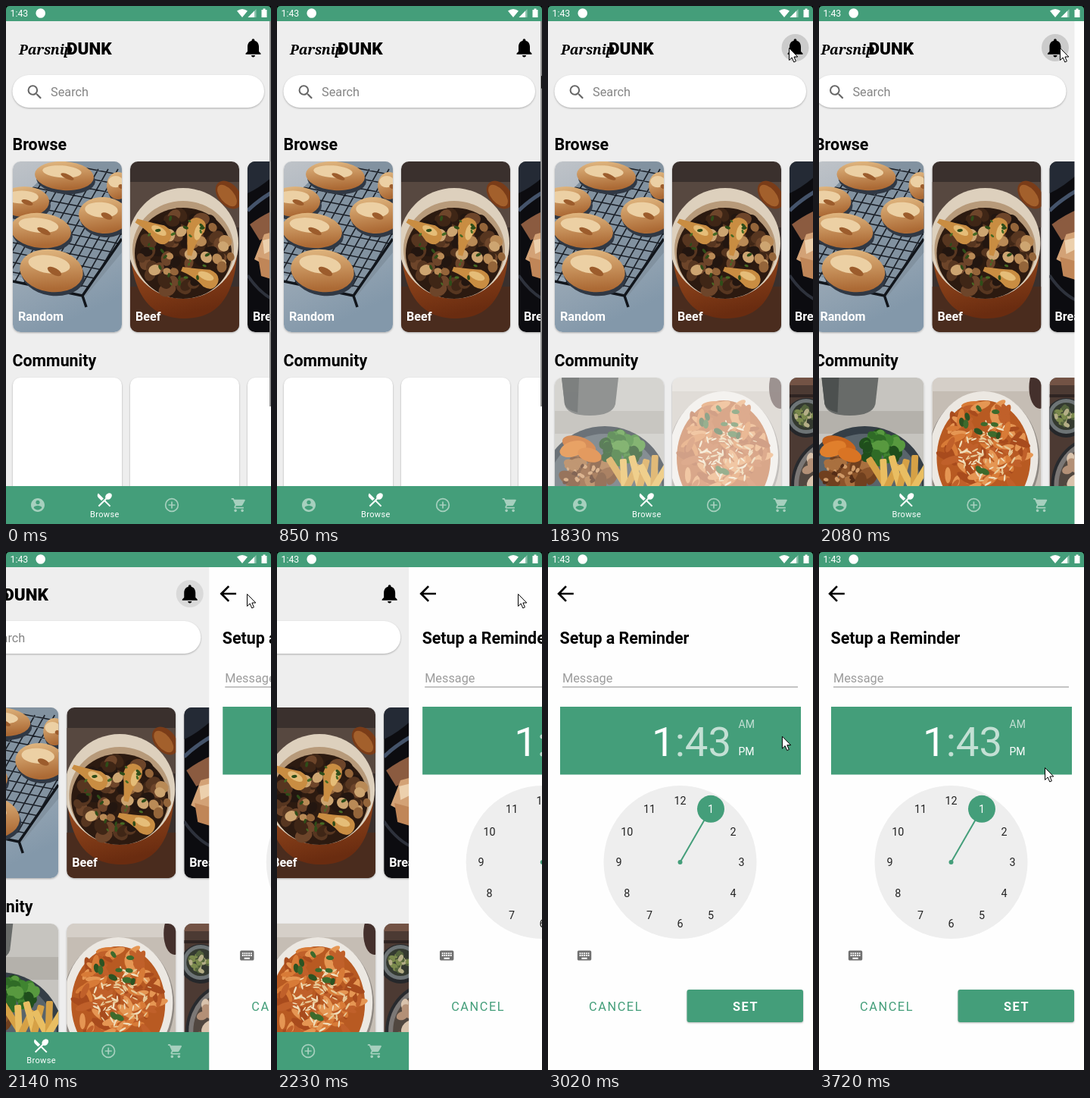
An HTML page that plays this animation: 350 by 683 pixels, repeating every 4.41 s.

```html
<!DOCTYPE html>
<html lang="en">
<head>
<meta charset="utf-8">
<title>Recipe app reminder</title>
<style>
  html, body { margin: 0; width: 100%; height: 100%; overflow: hidden; background: #fff; }
  svg { display: block; width: 350px; height: 683px; font-family: Roboto, sans-serif; }
  .bold { font-weight: 700; }
  .head { font-weight: 700; font-size: 21.4px; }
  .label { font-weight: 700; font-size: 16.1px; fill: #fff; }
  .lift { filter: drop-shadow(0 1px 1px rgba(0,0,0,.28)); }
  .mid { text-anchor: middle; }
</style>
</head>
<body>
<svg id="stage" viewBox="0 0 350 683"></svg>
<script>
const GREEN = '#449e7a', LOOP = 4410;

let seed = 7;
const rnd = () => (seed = (seed * 16807) % 2147483647) / 2147483647;
const pick = list => list[Math.floor(rnd() * list.length)];

const rect = (x, y, w, h, fill, more = '') =>
  `<rect x="${x}" y="${y}" width="${w}" height="${h}" fill="${fill}" ${more}/>`;
const oval = (x, y, rx, ry, fill, turn = 0) =>
  `<ellipse rx="${rx}" ry="${ry}" fill="${fill}" transform="translate(${x} ${y}) rotate(${turn})"/>`;
const path = (d, fill, more = '') => `<path d="${d}" fill="${fill}" ${more}/>`;
const text = (x, y, s, more = '') => `<text x="${x}" y="${y}" ${more}>${s}</text>`;
const group = (x, y, body, more = '') => `<g transform="translate(${x} ${y})" ${more}>${body}</g>`;
const icon = (x, y, k, d, fill) => path(d, fill, `transform="translate(${x} ${y}) scale(${k})"`);

// Random bits strewn inside an ellipse
function scatter(n, cx, cy, rx, ry, colors, w, h) {
  let out = '';
  for (let i = 0; i < n; i++) {
    const a = rnd() * 2 * Math.PI, r = Math.sqrt(rnd()), k = .7 + rnd() * .6;
    out += oval((cx + Math.cos(a) * r * rx).toFixed(1), (cy + Math.sin(a) * r * ry).toFixed(1),
      (w * k).toFixed(1), (h * k).toFixed(1), pick(colors), Math.floor(rnd() * 180));
  }
  return out;
}

const ICON = {
  bell: 'M12 22c1.1 0 2-.9 2-2h-4c0 1.1.89 2 2 2zm6-6v-5c0-3.07-1.64-5.64-4.5-6.32V4c0-.83-.67-1.5-1.5-1.5s-1.5.67-1.5 1.5v.68C7.63 5.36 6 7.92 6 11v5l-2 2v1h16v-1l-2-2z',
  search: 'M15.5 14h-.79l-.28-.27A6.47 6.47 0 0 0 16 9.5 6.5 6.5 0 1 0 9.5 16c1.61 0 3.09-.59 4.23-1.57l.27.28v.79l5 4.99L20.49 19l-4.99-5zm-6 0C7.01 14 5 11.99 5 9.5S7.01 5 9.5 5 14 7.01 14 9.5 11.99 14 9.5 14z',
  user: 'M12 2C6.48 2 2 6.48 2 12s4.48 10 10 10 10-4.48 10-10S17.52 2 12 2zm0 3c1.66 0 3 1.34 3 3s-1.34 3-3 3-3-1.34-3-3 1.34-3 3-3zm0 14.2c-2.5 0-4.71-1.28-6-3.22.03-1.99 4-3.08 6-3.08 1.99 0 5.97 1.09 6 3.08-1.29 1.94-3.5 3.22-6 3.22z',
  menu: 'M8.1 13.34l2.83-2.83L3.91 3.5c-1.56 1.56-1.56 4.09 0 5.66l4.19 4.18zm6.78-1.81c1.53.71 3.68.21 5.27-1.38 1.91-1.91 2.28-4.65.81-6.12-1.46-1.46-4.2-1.1-6.12.81-1.59 1.59-2.09 3.74-1.38 5.27L3.7 19.87l1.41 1.41L12 14.41l6.88 6.88 1.41-1.41L13.41 13l1.47-1.47z',
  cart: 'M7 18c-1.1 0-1.99.9-1.99 2S5.9 22 7 22s2-.9 2-2-.9-2-2-2zM1 2v2h2l3.6 7.59-1.35 2.45c-.16.28-.25.61-.25.96 0 1.1.9 2 2 2h12v-2H7.42c-.14 0-.25-.11-.25-.25l.03-.12.9-1.63h7.45c.75 0 1.41-.41 1.75-1.03l3.58-6.49A1 1 0 0 0 20 4H5.21l-.94-2H1zm16 16c-1.1 0-1.99.9-1.99 2s.89 2 1.99 2 2-.9 2-2-.9-2-2-2z',
  back: 'M20 11H7.83l5.59-5.59L12 4l-8 8 8 8 1.41-1.41L7.83 13H20v-2z',
  keys: 'M20 5H4c-1.1 0-1.99.9-1.99 2L2 17c0 1.1.9 2 2 2h16c1.1 0 2-.9 2-2V7c0-1.1-.9-2-2-2zm-9 3h2v2h-2V8zm0 3h2v2h-2v-2zM8 8h2v2H8V8zm0 3h2v2H8v-2zm-1 2H5v-2h2v2zm0-3H5V8h2v2zm9 7H8v-2h8v2zm0-4h-2v-2h2v2zm0-3h-2V8h2v2zm3 3h-2v-2h2v2zm0-3h-2V8h2v2z',
  pointer: 'M.5 .5V16.5L4.2 13 6.8 19 9.4 17.8 6.9 12H11.8Z'
};

function pastries() {
  let s = rect(0, 0, 144, 225, 'url(#slate)') + path('M0 60L60 0H144V120L96 178 0 150Z', '#8292a0');
  let wires = '';
  for (let i = 0; i < 13; i++) {
    wires += `M${i * 13 - 40} 165L${i * 13 + 48} 10`;
    wires += `M0 ${i * 13 - 10}L144 ${i * 13 + 18}`;
  }
  s += path(wires, 'none', 'stroke="#1b2028" stroke-width="1.6" clip-path="url(#rack)"');
  s += path('M0 158L92 177 144 102M92 177L97 192', 'none', 'stroke="#12161c" stroke-width="3.5"');
  for (const [x, y, rx, ry, a] of [[68, 19, 39, 19, 4], [15, 53, 33, 20, 0], [139, 32, 15, 18, 0],
    [120, 71, 33, 24, 4], [37, 91, 40, 23, 6], [51, 144, 42, 28, 8]])
    s += oval(x + 2, y + 5, rx, ry, '#303844', a) + oval(x, y, rx, ry, 'url(#crust)', a)
      + oval(x - 3, y - ry * .3, rx * .66, ry * .42, '#ecd0a4', a)
      + oval(x + 4, y + 1, rx * .24, ry * .16, '#9c5c2c', a + 20);
  return s;
}

function stew() {
  return rect(0, 0, 144, 225, '#3a302d') + rect(0, 27, 144, 60, '#574840')
    + rect(0, 165, 144, 60, '#4a2c1e')
    + oval(130, 44, 21, 14, '#7a3c18', 50) + oval(128, 45, 17, 9, '#a3602c', 50)
    + path('M0 110C2 180 30 207 72 207S140 180 142 110Z', 'url(#clay)')
    + oval(70, 108, 73, 73, '#ddd0bd') + oval(70, 116, 67, 64, '#b79a7a') + oval(70, 121, 64, 60, '#2c1a10')
    + scatter(70, 70, 121, 56, 52, ['#3f2616', '#573620', '#6d452a', '#231610'], 9, 7)
    + scatter(20, 78, 122, 55, 50, ['#b98a56', '#94653a', '#cda571'], 7, 6)
    + [[34, 93, 30], [86, 95, -75], [96, 153, 22]].map(([x, y, a]) => group(x, y,
      path('M-30 -3Q-10 -8 5 -13 21 -13 21 0 20 13 5 11 -10 3 -30 3Z', '#c98d42', `transform="rotate(${a})"`)
      + oval(4, -2, 11, 5, '#e5bd78', a))).join('')
    + scatter(26, 66, 118, 48, 45, ['#466a24', '#2f4d19'], 3, 1.6);
}

function skillet() {
  return rect(0, 0, 144, 225, '#0c0c10') + path('M0 42Q18 34 40 14V0H0Z', '#242a35')
    + path('M0 65Q15 50 40 36', 'none', 'stroke="#44536a" stroke-width="5"')
    + path('M3 83Q20 70 40 62V92L16 104Z', '#8b5b40')
    + path('M22 96L44 90V128L26 138 9 129Z', '#d3a276')
    + path('M14 126L44 134V159L18 151Z', '#c08658') + path('M20 104L40 99V113L22 122Z', '#ecd0ad')
    + path('M0 150Q18 177 42 186', 'none', 'stroke="#2e323c" stroke-width="4"');
}

function dinner() {
  return rect(0, 0, 144, 225, '#c6c4bf') + rect(0, 44, 144, 30, '#b4b1ab')
    + path('M9 0H84L80 35Q76 50 46 50T13 35Z', '#686b69') + path('M9 0H32L30 46Q16 43 13 35Z', '#4c504f')
    + oval(66, 146, 84, 82, '#343e46') + oval(66, 150, 76, 76, '#59646b')
    + scatter(22, 44, 128, 35, 22, ['#70401f', '#8c542b', '#a9703f'], 14, 8)
    + oval(32, 89, 23, 11, '#c9651d', 18) + oval(24, 94, 18, 10, '#e07f2c', -18) + oval(46, 102, 16, 9, '#d97424', 16)
    + scatter(48, 88, 94, 26, 21, ['#2f6b26', '#3f8430', '#1f4e1c', '#58993f'], 7, 6)
    + [0, 1, 2, 3, 4, 5, 6, 7].map(i => rect(-5, -24, 9, 48, i % 2 ? '#e9be62' : '#d6a146',
      `rx="2" transform="translate(${84 + i * 8} ${126 + i % 3 * 5}) rotate(${i * 29 % 70 - 32})"`)).join('')
    + scatter(20, 36, 130, 26, 16, ['#d09a68', '#542c16'], 3, 2);
}

function pasta() {
  return rect(0, 0, 144, 225, '#c5bdb4') + rect(0, 0, 144, 18, '#d5cfc8')
    + oval(142, 13, 14, 28, '#44302c') + oval(68, 107, 74, 88, '#8f8983') + oval(68, 104, 72, 86, '#ece8e2')
    + oval(68, 106, 62, 76, '#b85a22')
    + scatter(130, 68, 102, 54, 70, ['#d87b37', '#c0602a', '#e59653', '#a84b1d'], 11, 4)
    + scatter(90, 74, 98, 38, 42, ['#f0dfbd', '#e8c996'], 4, 1)
    + scatter(12, 68, 88, 48, 48, ['#3d6a2c', '#2c5322'], 6, 3.5);
}

function plank() {
  return rect(0, 0, 144, 225, '#4c3a33') + rect(0, 22, 144, 4, '#2e2422') + rect(0, 0, 144, 10, '#735345')
    + oval(22, 53, 27, 26, '#25272a') + oval(22, 51, 24, 23, '#6d7476') + oval(22, 51, 19, 18, '#343a30')
    + scatter(26, 20, 51, 15, 13, ['#7b8a4d', '#b4ae86', '#53633c'], 4, 2.5)
    + oval(66, 142, 64, 66, '#282a2e') + oval(66, 142, 60, 62, '#7b7775') + oval(66, 142, 54, 56, '#514740')
    + scatter(40, 55, 140, 44, 46, ['#d9c3ad', '#b39077', '#8a6248'], 10, 7);
}

function card(x, y, photo, label, id) {
  const body = id ? `<g id="${id}" clip-path="url(#card)">${photo}</g>` : `<g clip-path="url(#card)">${photo}</g>`;
  return group(x, y, rect(0, 0, 144, 225, '#fff', 'rx="10" class="lift"') + body
    + (label ? text(7, 210, label, 'class="label"') : ''));
}

const grad = (id, a, b) => `<linearGradient id="${id}" x2=".3" y2="1"><stop stop-color="${a}"/><stop offset="1" stop-color="${b}"/></linearGradient>`;
const defs = `<defs><clipPath id="card"><rect width="144" height="225" rx="10"/></clipPath>
  <clipPath id="rack"><path d="M0 60L60 0H144V102L92 177 0 158Z"/></clipPath>
  ${grad('slate', '#bfc3c8', '#8398aa')}${grad('crust', '#e6bf88', '#ac6a35')}${grad('clay', '#a45322', '#6a2c10')}</defs>`;

const pale = '#a6d0be';
const home = rect(0, 20, 354, 663, '#eee')
  + text(17, 64, 'Parsnip', 'font-size="18" font-weight="700" font-style="italic" letter-spacing="-.3" style="font-family:\'Noto Serif\',serif"')
  + text(80, 64, 'DUNK', 'font-size="22.5" font-weight="900"')
  + '<circle id="ripple" cx="326.5" cy="55" r="18" fill="#cbcbcb"/>'
  + icon(311.5, 40, 1.25, ICON.bell, '#000')
  + rect(8.5, 91, 332.5, 43, '#fff', 'rx="21.5" class="lift"')
  + icon(25.4, 101, 1.05, ICON.search, '#666') + text(59, 118.5, 'Search', 'font-size="16.3" fill="#858585"')
  + text(8.5, 190, 'Browse', 'class="head"') + text(8.5, 475, 'Community', 'class="head"')
  + card(9, 205, pastries(), 'Random') + card(164, 205, stew(), 'Beef') + card(319, 205, skillet(), 'Breakfast')
  + card(9, 490, dinner(), '', 'dish1') + card(164, 490, pasta(), '', 'dish2') + card(319, 490, plank(), '', 'dish3')
  + rect(348, 20, 2, 508, '#8f8f8f', 'id="bar"')
  + rect(0, 633, 354, 50, GREEN)
  + icon(31.2, 647.2, .9, ICON.user, pale) + icon(118, 639, 1, ICON.menu, '#fff')
  + text(130.3, 674, 'Browse', 'class="mid" font-size="11" letter-spacing=".35" fill="#fff"')
  + `<circle cx="219" cy="658" r="8.3" fill="none" stroke="${pale}" stroke-width="1.7"/>`
  + path('M219 653.5V662.5M214.5 658H223.5', 'none', `stroke="${pale}" stroke-width="1.7"`)
  + icon(296.8, 647.2, .9, ICON.cart, pale);

function dial() {
  const at = (h, r) => [174.5 + r * Math.sin(h * Math.PI / 6), 409 - r * Math.cos(h * Math.PI / 6)];
  const [x, y] = at(1, 81);
  let s = oval(174.5, 409, 101, 101, '#eee') + path(`M174.5 409L${x} ${y}`, 'none', `stroke="${GREEN}" stroke-width="2"`)
    + oval(174.5, 409, 3, 3, GREEN) + oval(x, y, 18, 18, GREEN);
  for (let h = 1; h <= 12; h++) {
    const [tx, ty] = at(h, 81);
    s += text(tx, ty + 5, h, `class="mid" font-size="14.3" fill="${h === 1 ? '#fff' : '#222'}"`);
  }
  return s;
}

const reminder = rect(-2, 20, 356, 663, '#fefefe')
  + icon(6.8, 38.8, 1.35, ICON.back, '#000') + text(15.5, 121, 'Setup a Reminder', 'class="head"')
  + text(19, 171.5, 'Message', 'font-size="16.3" fill="#9c9c9c"') + rect(19, 177.5, 311, 1, '#8c8c8c')
  + rect(16, 204, 318, 89.5, GREEN)
  + text(137, 269, '1<tspan fill-opacity=".68">:43</tspan>', 'font-size="54.5" fill="#fff"')
  + text(251.5, 232, 'AM', 'font-size="14" fill="#fff" fill-opacity=".68"') + text(251.5, 268, 'PM', 'font-size="14" fill="#fff"')
  + dial() + icon(37, 521, .92, ICON.keys, '#707070')
  + text(54, 605, 'CANCEL', `font-size="16.3" letter-spacing="1.6" fill="${GREEN}"`)
  + rect(183.5, 577, 153.5, 43, GREEN, 'rx="3" class="lift"')
  + text(261, 605, 'SET', 'class="mid bold" font-size="16.3" letter-spacing="1.6" fill="#fff"');

const status = rect(0, 0, 350, 20, '#000') + path('M0 20V5Q0 0 5 0H345Q350 0 350 5V20Z', GREEN)
  + text(5.5, 14, '1:43', 'font-size="12.3" fill="#fff"') + oval(45.7, 9.5, 6.3, 6.3, '#fff')
  + path('M305 6.5Q312 1.5 319 6.5L312 15Z', '#fff')
  + path('M330.5 4V15H319.5Z', '#fff', 'fill-opacity=".4"') + path('M328 6.5V15H319.5Z', '#fff')
  + path('M337.5 5H339.5V3.5H342.5V5H344.5V15H337.5Z', '#fff');

const stage = document.getElementById('stage');
stage.innerHTML = defs + `<g id="home">${home}</g><g id="page">${reminder}</g>${status}
  <circle id="glow" r="12" cx="318" cy="55" fill="#f3ee45" fill-opacity=".85"/>
  <g id="pointer">${path(ICON.pointer, '#fff', 'stroke="#000" stroke-width="1"')}</g>`;
const el = Object.fromEntries([...stage.querySelectorAll('g[id], circle[id], rect[id]')].map(e => [e.id, e]));

// Tables of [time, value]; straight runs between the rows
function track(rows, t) {
  const i = rows.findIndex(r => r[0] > t);
  if (i === 0) return rows[0][1];
  if (i < 0) return rows[rows.length - 1][1];
  const [a, p] = rows[i - 1], [b, q] = rows[i];
  return p + (q - p) * (t - a) / (b - a);
}
const slide = [[2030, 0], [2050, 5], [2080, 13.5], [2110, 45], [2150, 95], [2190, 139], [2230, 177], [2290, 228],
  [2350, 262], [2410, 288], [2470, 310], [2530, 331], [2590, 352], [2700, 354]];
const pointX = [[849, 362], [850, 349], [1000, 342], [1200, 325], [1350, 318], [2610, 318], [2860, 316], [3110, 305],
  [3270, 303], [3550, 303], [3720, 298]];
const pointY = [[850, 92], [1000, 80], [1200, 61], [1350, 55], [2610, 55], [2740, 95], [2960, 225], [3140, 277],
  [3270, 289], [3550, 289], [3720, 284]];
const fades = {
  bar: [[860, 1], [1150, 0]],
  dish3: [[1000, 0], [1300, 1]],
  dish1: [[1650, 0], [1900, 1]],
  dish2: [[1700, 0], [1950, 1]],
  ripple: [[1640, 0], [1760, 1], [2080, 1], [2220, 0]],
  glow: [[1549, 0], [1550, 1], [1630, 1], [1750, 0]]
};

function draw(t) {
  const x = track(slide, t);
  el.home.setAttribute('transform', `translate(${-x} 0)`);
  el.page.setAttribute('transform', `translate(${354 - x} 0)`);
  el.pointer.setAttribute('transform', `translate(${track(pointX, t)} ${track(pointY, t)})`);
  for (const id in fades) el[id].setAttribute('opacity', track(fades[id], t));
}

const start = performance.now();
function tick() {
  draw((performance.now() - start) % LOOP);
  requestAnimationFrame(tick);
}
tick();
</script>
</body>
</html>
```
